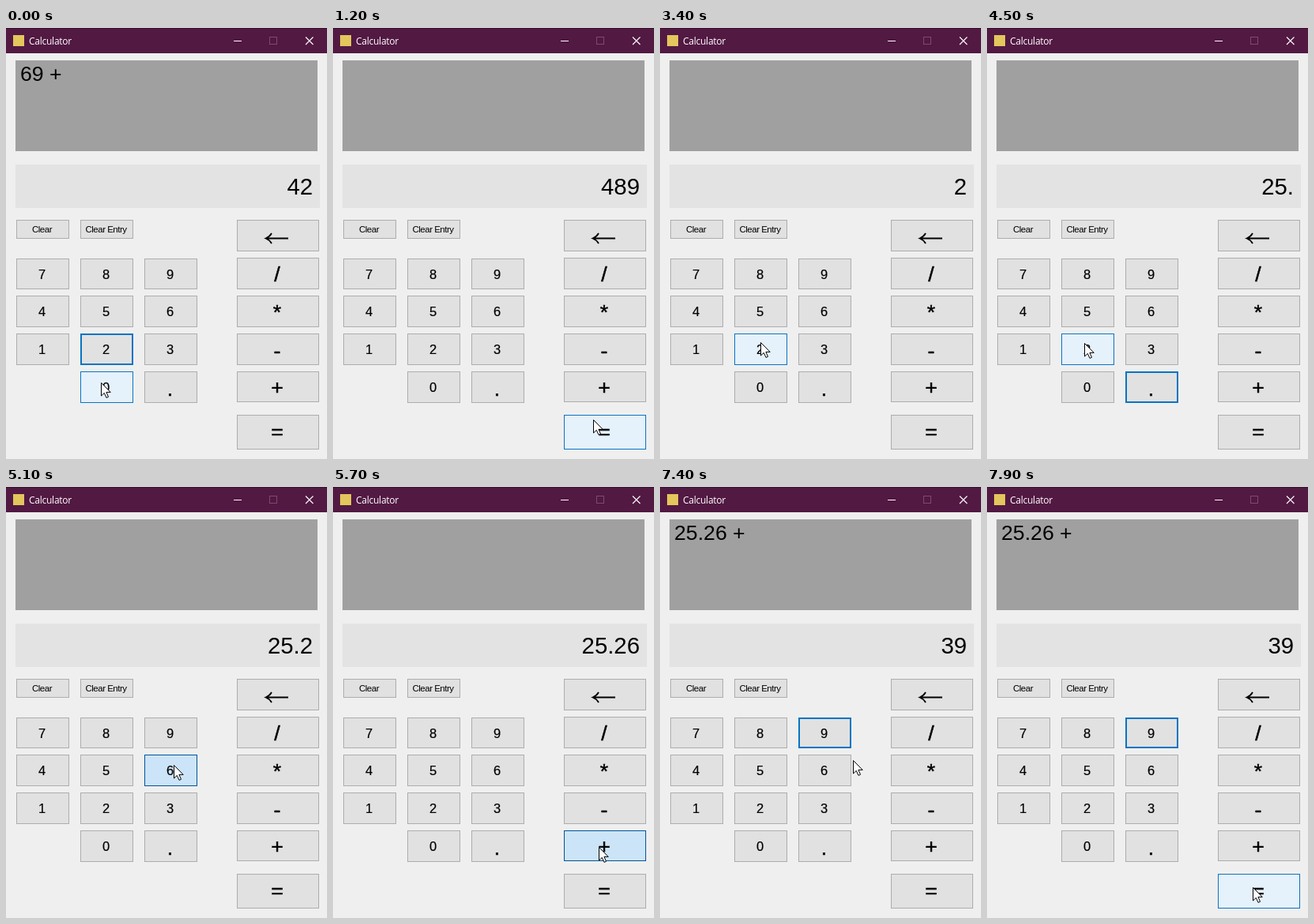
An HTML page that plays this animation: 406 by 546 pixels, repeating every 8 s.

```html
<!DOCTYPE html>
<html lang="en">
<head>
<meta charset="utf-8">
<title>Calculator</title>
<style>
  html, body { margin: 0; width: 100%; height: 100%; overflow: hidden; background: #efefef; }
  #stage { display: block; width: 406px; height: 546px; font-family: "Liberation Sans", Arial, sans-serif; }
  .title { font: 12px "Open Sans", "Noto Sans", sans-serif; letter-spacing: -.25px; fill: #fff; }
  /* Each key clips its frame, so half of every stroke shows. */
  .key { overflow: hidden; }
  .key rect { fill: #e1e1e1; stroke: #adadad; stroke-width: 2; }
  .key.focus rect { stroke: #0874c4; stroke-width: 4; }
  .key.hover rect { fill: #e5f1fb; stroke: #0874c4; }
  .key.down rect { fill: #cce4f7; stroke: #005499; }
  .key text { text-anchor: middle; }
  .digit { font-size: 16.5px; stroke: #000; stroke-width: .2; }
  .sign { font-size: 26.67px; stroke: #000; stroke-width: .5; }
  .small { font-size: 11.5px; letter-spacing: -.5px; }
</style>
</head>
<body>
<svg id="stage" viewBox="0 0 406 546">
  <rect width="406" height="546" fill="#efefef"/>
  <rect width="406" height="32" fill="#521943"/>
  <rect width="406" height="1" fill="#32102a"/>
  <rect x="9" y="9" width="14" height="14" fill="#e3c65c"/>
  <text class="title" x="29" y="20.5">Calculator</text>
  <path d="M288 16.5H298M379 11.5L388.5 21M388.5 11.5L379 21" fill="none" stroke="#fff" stroke-width="1.1"/>
  <rect x="333.5" y="11.5" width="9" height="9" fill="none" stroke="#7d4b70"/>
  <rect x="12" y="41" width="382" height="115" fill="#a0a0a0"/>
  <rect x="12" y="173" width="385" height="55" fill="#e3e3e3"/>
  <text id="history" x="18" y="67" font-size="26.67"></text>
  <text id="entry" x="388" y="211" font-size="29.33" text-anchor="end"></text>
  <g id="keys"></g>
  <path id="cursor" d="M.5 .5V17L4.3 13.4L7 19.4L9.5 18.3L6.9 12.4H12.2Z" fill="#fff" stroke="#000"/>
</svg>
<script>
const LOOP = 8000, STEP = 100;
const $ = id => document.getElementById(id);
const keys = {};

function addKey(name, x, top, w, h, type, base) {
  const y = Math.round(top), height = Math.round(top + h) - y;
  const el = document.createElementNS("http://www.w3.org/2000/svg", "svg");
  Object.entries({ x, y, width: w, height }).forEach(a => el.setAttribute(...a));
  const label = name === "←"
    ? '<path d="M37 23.5H65M44 17Q41.5 21.5 36.5 23.5Q41.5 25.5 44 30" fill="none" stroke="#000" stroke-width="1.8"/>'
    : `<text class="${type}" x="${w / 2 - 1}" y="${base}">${name}</text>`;
  el.innerHTML = '<rect width="100%" height="100%"/>' + label;
  $("keys").append(el);
  keys[name] = { el, x, y, w, h: height };
}

const column = c => 13 + 81 * c;
const row = r => 291.6 + 47.75 * r;

["Clear", "Clear Entry"].forEach((name, c) => addKey(name, column(c), 243, 67, 24, "small", 16));
[..."789456123"].forEach((name, i) =>
  addKey(name, column(i % 3), row(Math.floor(i / 3)), 67, 39.8, "digit", 25.5));
addKey("0", column(1), row(3), 67, 39.8, "digit", 25.5);
addKey(".", column(2), row(3), 67, 39.8, "sign", 31);
addKey("←", 292, 243, 104, 40);
const baselines = { "/": 30, "*": 30, "-": 30.5, "+": 29 };
Object.keys(baselines).forEach((name, r) =>
  addKey(name, 292, row(r) - .2, 104, 39.8, "sign", baselines[name]));
addKey("=", 292, 490, 104, 44, "sign", 30);

// Each click: press time, key, cursor tip
const clicks = [
  [100, "0", 120, 449], [1000, "=", 329, 496], [2300, "Clear", 45, 252],
  [3200, "2", 127, 398], [3700, "5", 126, 352], [4100, ".", 205, 459],
  [4600, "2", 123, 399], [5100, "6", 212, 352], [5700, "+", 336, 456],
  [6300, "3", 212, 388], [7000, "9", 214, 294], [8000, "=", 336, 507]
];

// The cursor arrives one step before a press and leaves two steps after it.
function cursorAt(t) {
  const i = clicks.findIndex(([press]) => press - STEP > t);
  if (i < 0) return clicks.at(-1).slice(2);
  const [last, , x0, y0] = clicks[i - 1], [press, , x1, y1] = clicks[i];
  const end = press - STEP, begin = Math.max(last + 2 * STEP, end - 7 * STEP);
  const u = Math.max(0, (t - begin) / (end - begin));
  const e = (u + u * u * (3 - 2 * u)) / 2;
  return [Math.round(x0 + (x1 - x0) * e), Math.round(y0 + (y1 - y0) * e)];
}

function apply(s, key) {
  if (key === "Clear") {
    s.entry = "0";
    s.history = "";
  } else if (key === "+") {
    s.history = s.entry + " +";
    s.fresh = true;
  } else if (key === "=") {
    s.entry = String(parseFloat(s.history) + Number(s.entry));
    s.history = "";
    s.fresh = true;
  } else {
    s.entry = s.fresh || s.entry === "0" ? key : s.entry + key;
    s.fresh = false;
  }
}

function stateAt(t) {
  const s = { entry: "42", history: "69 +", focus: "2", down: "", fresh: false };
  for (const [press, key] of clicks) {
    if (t < press) break;
    s.focus = key;
    if (t < press + STEP) s.down = key;
    else apply(s, key);
  }
  return s;
}

function draw(now) {
  const t = Math.floor(now % LOOP / STEP) * STEP;
  const s = stateAt(t), [x, y] = cursorAt(t);
  $("history").textContent = s.history;
  $("entry").textContent = s.entry;
  $("cursor").setAttribute("transform", `translate(${x} ${y})`);
  for (const [name, k] of Object.entries(keys)) {
    const over = x >= k.x && x < k.x + k.w && y >= k.y && y < k.y + k.h;
    const mode = name === s.down ? "down" : over ? "hover" : name === s.focus ? "focus" : "";
    k.el.setAttribute("class", "key " + mode);
  }
}

const start = performance.now();
function tick() {
  draw(performance.now() - start);
  requestAnimationFrame(tick);
}
tick();
</script>
</body>
</html>
```
